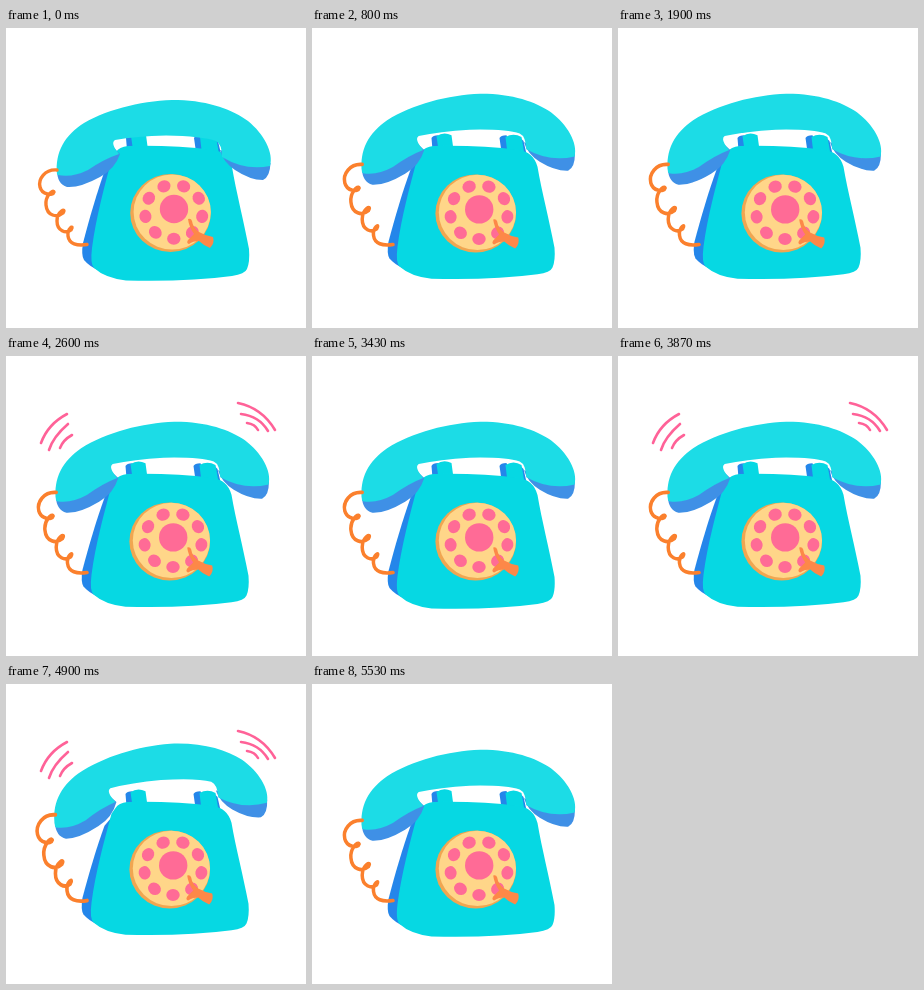
An HTML page that plays this animation: 300x300 px, repeating every 5610 ms.

```html
<!DOCTYPE html>
<html lang="en">
<head>
<meta charset="utf-8">
<title>Ringing telephone</title>
<style>
  html, body { margin: 0; width: 100%; height: 100%; overflow: hidden; background: #fff; }
  svg { display: block; width: 100vw; height: 100vh; }
  .body { fill: #06d8e3; }
  .grip { fill: #1cdce6; }
  .side { fill: #2486ea; }
  .under { fill: #3f90e6; }
  .pink { fill: #ff6b96; }
  .line { fill: none; stroke-linecap: round; stroke-linejoin: round; }
</style>
</head>
<body>
<svg viewBox="0 0 300 300">
  <g id="base">
    <path class="side" d="M120 110Q121 107 127 107L132 122H121ZM188 110Q189 107 195 107L201 124H190ZM208 109L212 113L215 126L209 124Z"/>
    <path class="body" d="M125 108Q132 103 140 107L142 122H127ZM194 109Q202 104 210 109L213 126H196Z"/>
    <path class="side" d="M99 142C91 164 83 192 77 215Q75 227 78 232Q83 238 92 242L114 124Z"/>
    <path class="body" d="M110 124Q113 119 122 118Q168 117 207 122Q222 124 226 139C230 163 238 194 243 221Q244 234 241 241Q239 246 226 248Q182 254 120 252.5Q99 250 88 240Q84 236 86 220C90 190 98 160 106 130Z"/>
  </g>
  <g id="dial">
    <ellipse cx="164.5" cy="185" rx="40.3" ry="39" fill="#f0a651"/>
    <ellipse cx="166.2" cy="184" rx="38.6" ry="37.6" fill="#ffd689"/>
    <circle class="pink" cx="168" cy="181" r="14.2"/>
    <g id="holes" class="pink"></g>
    <path d="M182 191Q185 190 186 193Q187 200 193 204Q200 208 207 209Q209 215 204 220Q197 217 193 213Q187 213 183 216Q180 215 182 212L188 206Q183 199 182 191Z" fill="#fd8848"/>
  </g>
  <g id="handset">
    <path class="under" d="M51 142Q51 156 61 159Q74 160 94 149Q109 141 114 126L107 119ZM214 122Q217 134 229 142Q244 152 257 152Q264 149 264.5 135Z"/>
    <path class="grip" d="M51 146C49 124 59 107 78 95C104 80 140 72 172 72C204 73 227 82 242 93C258 106 268 125 264 138Q239 143 216 129Q216 116 210 113Q196 108 160 107.5Q130 108 109 112Q104 115 113 126Q98 131 82 142Q66 150 52 147Z"/>
  </g>
  <path id="cord" class="line" stroke="#fb802d" stroke-width="3.4" d="M51 142C39 141 32 151 34 159C36 167 47 168 48 164C47 161 39 168 40 177C41 188 51 190 57 185C61 179 51 183 51 193C51 203 60 206 65 202C69 196 61 200 62 208C63 216 71 218 81 216.5"/>
  <g id="rings" class="line" stroke="#ff6298" stroke-width="2.6">
    <path d="M35 87Q42 68 61 58M43 94Q47 81 62 68M54 92Q57 84 66 79"/>
    <path d="M232 47Q256 52 269 74M235 58Q253 60 262 75M241 67Q249 68 252 74"/>
  </g>
</svg>
<script>
  const LOOP = 5610, BEAT = 700, STEP = 200 / 3;
  const byId = id => document.getElementById(id);
  const [base, dial, handset, cord, rings, holes] =
    ['base', 'dial', 'handset', 'cord', 'rings', 'holes'].map(byId);

  for (let degrees = 10; degrees < 370; degrees += 40) {
    const angle = degrees * Math.PI / 180;
    const hole = document.createElementNS('http://www.w3.org/2000/svg', 'ellipse');
    const x = 167.8 + 28.8 * Math.cos(angle), y = 183.7 + 27 * Math.sin(angle);
    hole.setAttribute('transform', `translate(${x} ${y}) rotate(${degrees})`);
    hole.setAttribute('rx', 6);
    hole.setAttribute('ry', 6.7);
    holes.append(hole);
  }

  // Ten drawings per beat; the first is held longer.
  function drawingAt(time) {
    const beat = Math.min(7, Math.floor(time / BEAT));
    const rest = time - beat * BEAT;
    const index = rest < 100 ? 0 : 1 + Math.floor((rest - 96) / STEP);
    return beat * 10 + Math.min(9, index);
  }

  function render(time) {
    const pose = drawingAt(time) % 16;
    const lift = 1.08 * (1 - Math.cos(pose * Math.PI / 2));
    const squash = pose >= 4 && pose <= 11 ? 0.987 : 1;
    const nudge = Math.min(1, lift);

    handset.setAttribute('transform',
      `translate(${-0.8 * lift} ${-2.8 * lift}) rotate(${-1.95 * lift} 85 150)`);
    cord.setAttribute('transform',
      `translate(80 216) scale(${1 + 0.025 * lift} ${1 + 0.07 * lift}) translate(-80 -216)`);
    base.setAttribute('transform',
      `translate(${-0.5 * nudge} 118) scale(1 ${squash}) translate(0 -118)`);
    dial.setAttribute('transform', `translate(${-0.8 * nudge} ${0.4 * nudge})`);
    rings.setAttribute('visibility', pose >= 4 && pose < 8 ? 'visible' : 'hidden');
  }

  const start = performance.now();
  function tick() {
    render((performance.now() - start) % LOOP);
    requestAnimationFrame(tick);
  }
  tick();
</script>
</body>
</html>
```
